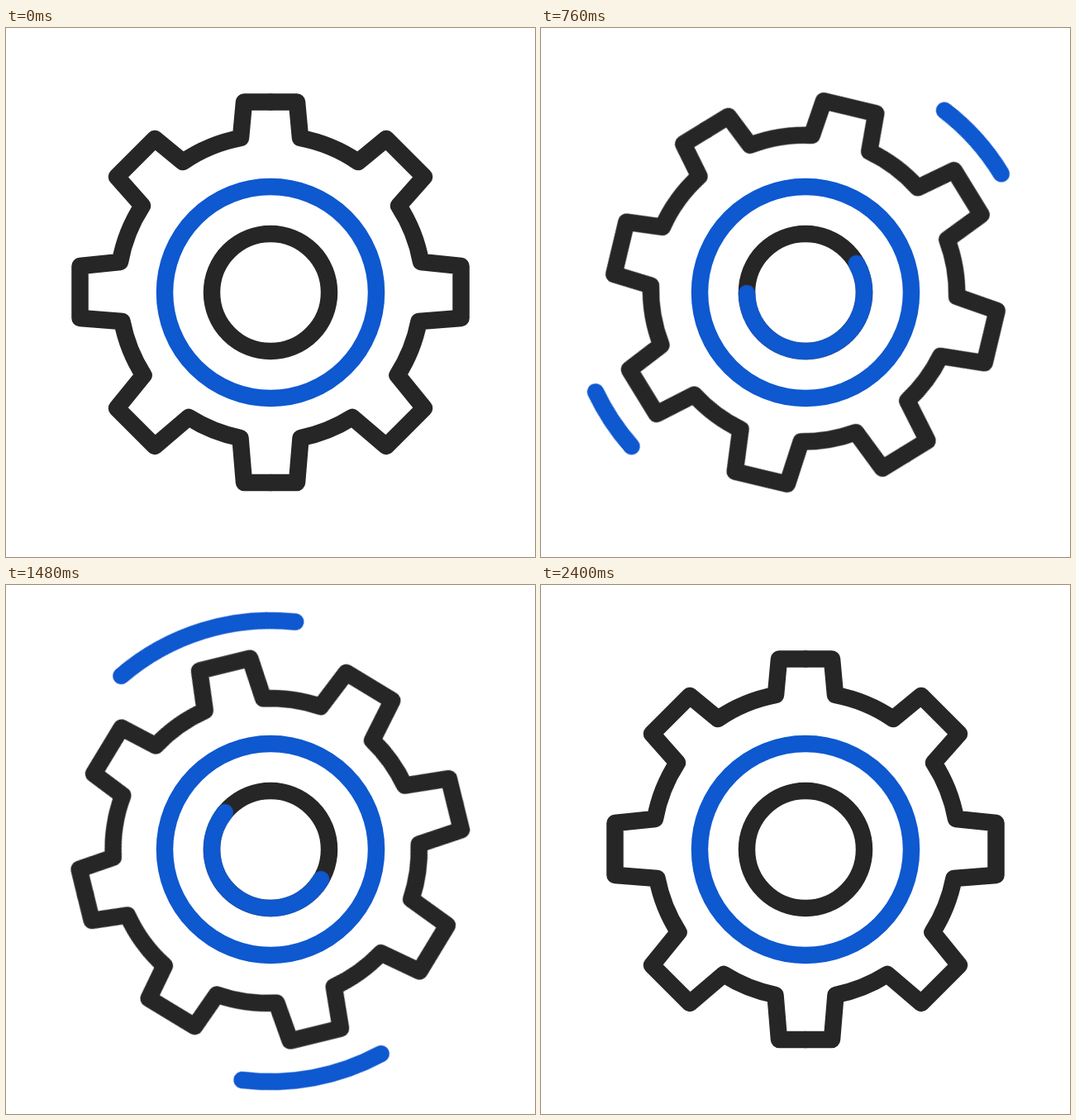
These frames come from a looping animation (640 px wide and 640 px high, 2480 ms). An HTML page without scripts:

```html
<!DOCTYPE html>
<html lang="en">
<head>
<meta charset="utf-8">
<title>Turning gear</title>
<style>
  :root { --ink: #262626; --blue: #0e58d0; }
  html, body { margin: 0; width: 100%; height: 100%; overflow: hidden; background: #fff; }
  svg { display: block; width: 100%; height: 100%; }
  .line { fill: none; stroke: var(--ink); stroke-width: 20.5; stroke-linecap: round; stroke-linejoin: round; }
  .blue { stroke: var(--blue); }
  .gear, .sweep, .show { animation: 2480ms linear infinite; transform-origin: 0 0; }
  .gear { animation-name: turn; }

  /* Each sweep rotates to its leading end; the dash gives its length. */
  .right { animation-name: right; }
  .left { animation-name: left; }
  .hub { animation-name: hub; }
  .cap { animation-name: hub-turn; stroke-dasharray: .01 360; }
  .show { animation-timing-function: step-end; }
  .show-trails { animation-name: show-trails; }
  .show-hub { animation-name: show-hub; }
  .show-cap { animation-name: show-cap; }

  @keyframes turn {
    0%, 1.613% { transform: rotate(0deg); animation-timing-function: cubic-bezier(.76, 0, .58, 1); }
    56.452% { transform: rotate(-105deg); animation-timing-function: cubic-bezier(.46, 0, .32, 1); }
    96.774%, 100% { transform: rotate(0deg); }
  }
  @keyframes right {
    0%, 21.774% { transform: rotate(0deg); stroke-dasharray: .1 360; }
    24.194% { transform: rotate(-6.2deg); stroke-dasharray: 5.8 360; animation-timing-function: cubic-bezier(.33, .17, .67, .78); }
    37.097% { transform: rotate(-102deg); stroke-dasharray: 38 360; animation-timing-function: cubic-bezier(.25, .62, .6, 1); }
    54.839% { transform: rotate(-137deg); stroke-dasharray: 48 360; animation-timing-function: cubic-bezier(.5, 0, .67, .6); }
    59.677% { transform: rotate(-130.8deg); stroke-dasharray: 47 360; animation-timing-function: cubic-bezier(.33, .22, .67, .5); }
    72.581% { transform: rotate(-83.2deg); stroke-dasharray: 23.2 360; animation-timing-function: cubic-bezier(.33, .23, .67, .67); }
    83.065%, 100% { transform: rotate(-4deg); stroke-dasharray: 4 360; }
  }
  @keyframes left {
    0%, 21.774% { transform: rotate(189deg); stroke-dasharray: .1 360; }
    24.194% { transform: rotate(184.2deg); stroke-dasharray: 4.5 360; animation-timing-function: cubic-bezier(.33, .17, .67, .78); }
    37.097% { transform: rotate(90deg); stroke-dasharray: 28.5 360; animation-timing-function: cubic-bezier(.25, .62, .6, 1); }
    54.839% { transform: rotate(56deg); stroke-dasharray: 36 360; animation-timing-function: cubic-bezier(.5, 0, .67, .6); }
    59.677% { transform: rotate(61.5deg); stroke-dasharray: 35.5 360; animation-timing-function: cubic-bezier(.33, .22, .67, .5); }
    72.581% { transform: rotate(104.6deg); stroke-dasharray: 17.7 360; animation-timing-function: cubic-bezier(.33, .23, .67, .67); }
    83.065%, 100% { transform: rotate(185deg); stroke-dasharray: 4 360; }
  }
  @keyframes hub {
    0%, 16.129% { transform: rotate(-90deg); stroke-dasharray: .1 360; animation-timing-function: cubic-bezier(.4, .15, .7, .6); }
    24.194% { transform: rotate(-223deg); stroke-dasharray: 105 360; }
    37.097% { transform: rotate(-554deg); stroke-dasharray: 311 360; animation-timing-function: cubic-bezier(.25, .6, .6, 1); }
    56.452% { transform: rotate(-712deg); stroke-dasharray: 210 360; animation-timing-function: cubic-bezier(.5, 0, .67, .6); }
    59.677% { transform: rotate(-690deg); stroke-dasharray: 189 360; }
    72.581% { transform: rotate(-492deg); stroke-dasharray: 40 360; }
    75%, 100% { transform: rotate(-453deg); stroke-dasharray: 3 360; }
  }
  @keyframes hub-turn {
    0%, 59.677% { transform: rotate(-690deg); }
    72.581% { transform: rotate(-492deg); }
    75%, 100% { transform: rotate(-453deg); }
  }
  @keyframes show-trails {
    0%, 83.065%, 100% { opacity: 0; }
    21.774% { opacity: 1; }
  }
  @keyframes show-hub {
    0%, 75%, 100% { opacity: 0; }
    16.129% { opacity: 1; }
  }
  @keyframes show-cap {
    0%, 75%, 100% { opacity: 0; }
    66.129% { opacity: 1; }
  }
</style>
</head>
<body>
<svg viewBox="0 0 640 640" role="img" aria-label="Turning gear">
  <defs>
    <path id="half" d="M0-230.5H32L36-187A185 185 0 0 1 106-158L140-186 186-140 155-105A185 185 0 0 1 182-37L230.5-32V31L179.500 35A185 185 0 0 1 153.500 100L186 140 140 186 99 151A185 185 0 0 1 36.500 176L32 230H0"/>
  </defs>
  <g class="line" transform="translate(320 320)">
    <g class="gear">
      <use href="#half"/>
      <use href="#half" transform="scale(-1 1)"/>
    </g>
    <circle class="blue" r="128"/>
    <circle r="71"/>
    <g class="show show-hub"><circle class="blue sweep hub" r="71" pathLength="360"/></g>
    <g class="show show-cap"><circle class="sweep cap" r="71" pathLength="360"/></g>
    <g class="blue show show-trails">
      <circle class="sweep right" r="277" pathLength="360"/>
      <circle class="sweep left" r="281" pathLength="360"/>
    </g>
  </g>
</svg>
</body>
</html>
```
